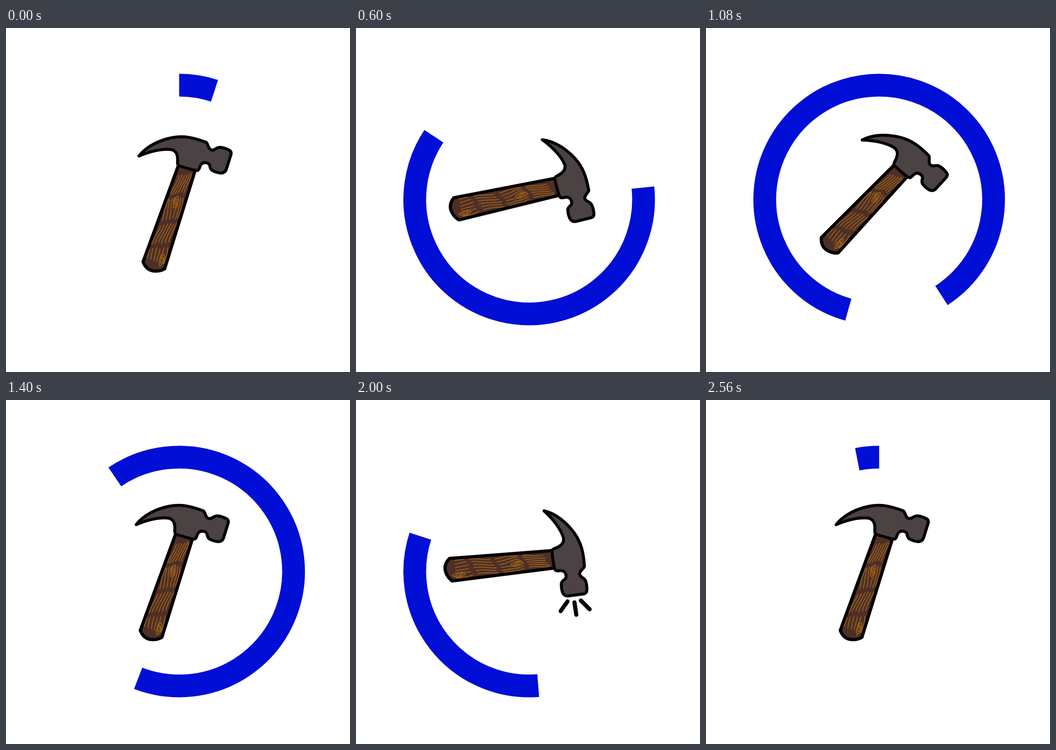
Recreate the animation shown at these times as an HTML page. Size 748 by 748 pixels, loop 2600 ms.

```html
<!DOCTYPE html>
<html lang="en">
<head>
<meta charset="utf-8">
<title>Hammer loader</title>
<style>
  html, body { margin: 0; width: 100%; height: 100%; overflow: hidden; background: #fff; }
  svg { display: block; width: 100vw; height: 100vh; }
</style>
</head>
<body>
<svg viewBox="0 0 748 748" fill="none" stroke-linecap="round" stroke-linejoin="round">
  <path id="ring" stroke="#010fd6" stroke-width="49.5" stroke-linecap="butt"/>
  <g id="hammer" stroke="#050303">
    <path fill="#4e2f26" stroke-width="7"
      d="M369 291L292 501C297 514 306 521 319 521C327 521 334 519 339 516L406 300Z"/>
    <path id="grain" transform="translate(387 298) rotate(18.8)" stroke="#9c621a" stroke-width="1.8"/>
    <path fill="#4a4243" stroke-width="6.5"
      d="M283 271C300 249 329 236 355 231C381 226 402 231 429 241C434 244 433 257 442 258
         C450 258 451 251 460 252Q470 253 479 258Q485 261 483 268L473 300Q470 308 461 308
         Q451 307 442 302Q438 299 437 291C435 285 424 283 419 288C414 293 416 299 411 302
         Q407 303 393 299L370 292Q367 291 367 284C368 271 366 260 354 257C334 254 306 261 283 271Z"/>
  </g>
  <path id="sparks" stroke="#050303" stroke-width="9" d="M460 438L445 459M475 440L479 467M489 436L508 455"/>
</svg>
<script>
const LOOP = 2600, STEP = 40;
const el = id => document.getElementById(id);
const ring = el('ring'), hammer = el('hammer'), sparks = el('sparks');
const clamp = x => Math.max(0, Math.min(1, x));

// Uneven pace of the turn: time in ms, degrees
const pace = [[40, 0], [600, 84], [1080, 147], [1400, 201], [1760, 246], [2000, 288], [2560, 360]];

function turnAt(t) {
  if (t <= pace[0][0]) return 0;
  const i = pace.findIndex(([time]) => t <= time);
  const [t0, a] = pace[i - 1], [t1, b] = pace[i];
  return a + (b - a) * (t - t0) / (t1 - t0);
}

function arc(from, to) {
  const r = 248.75;
  const point = deg => {
    const a = deg * Math.PI / 180;
    return (376.5 + r * Math.sin(a)).toFixed(2) + ' ' + (373 - r * Math.cos(a)).toFixed(2);
  };
  return `M${point(from)}A${r} ${r} 0 ${to - from > 180 ? 1 : 0} 1 ${point(to)}`;
}

// Wood grain: wavy broken lines that part around two knots
function grain() {
  const knots = [{ x: 1, y: 77 }, { x: 13, y: 206 }];
  let d = '';
  for (let i = 0; i < 6; i++) {
    let pen = 'M';
    for (let y = 8; y < 214; y += 4) {
      const half = 14 + y * 0.027;
      let x = half * (i - 2.5) / 2.7 + 3 * Math.sin(y / 17 + i * 0.35);
      for (const k of knots) {
        const off = x - k.x;
        x += Math.sign(off) * 6 * Math.exp(-(((y - k.y) / 15) ** 2) - Math.abs(off) / 9);
      }
      x = Math.max(-half, Math.min(half, x));
      const gap = Math.sin(i * 12.9 + y * 0.11) > 0.9;
      if (!gap) d += `${pen}${x.toFixed(1)} ${y}`;
      pen = gap ? 'M' : 'L';
    }
  }
  for (const { x, y } of knots) {
    for (const s of [1, 0.5]) {
      d += `M${x} ${y - 14 * s}q${10 * s} ${14 * s} 0 ${28 * s}q${-10 * s} ${-14 * s} 0 ${-28 * s}`;
    }
  }
  return d;
}

function draw(ms) {
  const turn = turnAt(Math.floor(ms % LOOP / STEP) * STEP);
  const head = Math.min(360, 18 + 2.4 * turn);
  const tail = Math.max(0, 1.41 * (turn - 112.5));
  ring.setAttribute('d', arc(turn + tail, turn + head));

  // Two strokes per turn: wait, strike, rest, lift; the first sits a little lower
  const phase = turn % 180;
  const k = clamp(Math.min((phase - 21) / 70, (171 - phase) / 63));
  const [sx, sy] = turn < 180 ? [6, 7.5] : [0, 0];
  hammer.setAttribute('transform',
    `translate(${sx - 43.7 * k} ${sy - 57 * k}) rotate(${65.5 * k} 346.8 416.3)`);
  sparks.setAttribute('transform', `translate(${sx} ${sy})`);
  sparks.setAttribute('visibility', k === 1 ? 'visible' : 'hidden');
}

el('grain').setAttribute('d', grain());
const start = performance.now();
function tick() {
  draw(performance.now() - start);
  requestAnimationFrame(tick);
}
tick();
</script>
</body>
</html>
```
